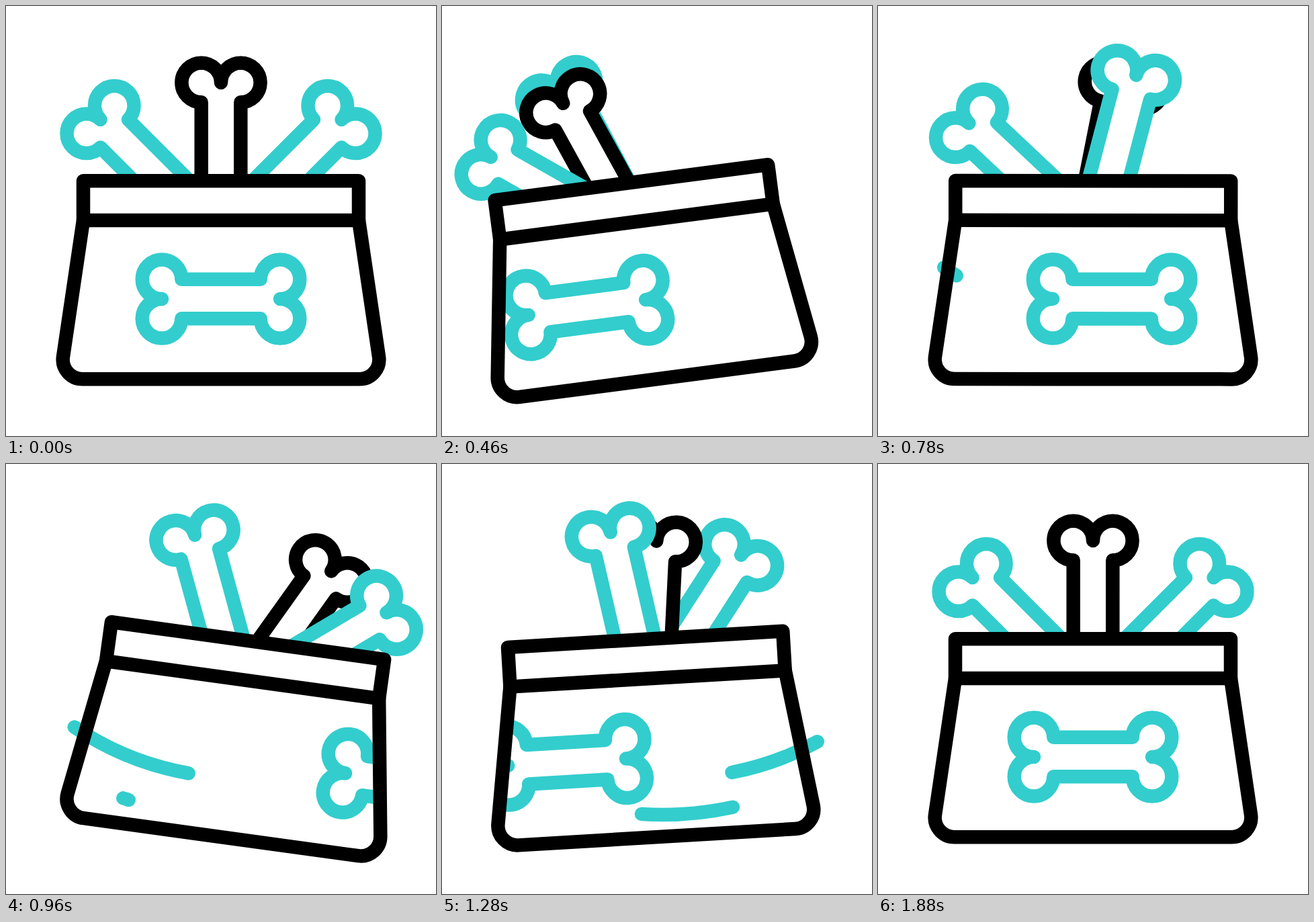
Write an HTML page that moves like this. It is 640 px wide and 640 px high and loops after 2.4 s.

```html
<!DOCTYPE html>
<html lang="en">
<head>
<meta charset="utf-8">
<title>Swinging bag of bones</title>
<style>
  html, body { margin: 0; width: 100%; height: 100%; overflow: hidden; background: #fff; }
  svg { display: block; width: 100vw; height: 100vh; }
  path { stroke-width: 20.5; stroke-linecap: round; stroke-linejoin: round; fill: none; stroke: #000; }
  .teal { stroke: #33cdcd; }
  .solid { fill: #fff; }
  .cover { fill: #fff; stroke: none; }
</style>
</head>
<body>
<svg viewBox="0 0 640 640">
  <defs>
    <clipPath id="inside">
      <path d="M115 319L85 522A29 29 0 0 0 113.8 555.2H526.2A29 29 0 0 0 555 522L525 319Z"/>
    </clipPath>
  </defs>
  <g id="loose"></g>
  <g id="back">
    <path class="cover" d="M115 260.3H525V319L555 522A29 29 0 0 1 526.2 555.2H113.8A29 29 0 0 1 85 522L115 319Z"/>
    <g clip-path="url(#inside)">
      <path id="printOut" class="teal"/>
      <path id="printIn" class="teal"/>
    </g>
  </g>
  <path id="streakA" class="teal"/>
  <path id="streakB" class="teal"/>
  <g id="front">
    <path d="M115 319L85 522A29 29 0 0 0 113.8 555.2H526.2A29 29 0 0 0 555 522L525 319"/>
    <path d="M115 260.3H525V319H115Z"/>
  </g>
</svg>
<script>
const LOOP = 2400;
const HEAD = 29.3;
const PIVOT = [320, 348.5];
const $ = id => document.getElementById(id);

// Each track is a list of [time, value], eased between neighbours.
const tracks = {
  bag: [[0, 0], [560, -8.1], [1002, 8.2], [1325, -4], [1620, 2], [1885, 0]],
  left: [[0, 0], [450, -8], [765, -2], [1150, 44.5], [1600, 0]],
  middle: [[0, 0], [465, -21.4], [985, 28], [1410, 0]],
  right: [[0, 0], [555, -71], [1000, 8.3], [1175, -10.5], [1600, 0]],
  printOut: [[0, 0], [590, -102], [1170, 410]],
  printIn: [[1030, -380], [1440, 0]]
};

const clamp = v => Math.max(0, Math.min(1, v));
const ease = v => v * v * (3 - 2 * v);

function valueAt(keys, t) {
  let i = 0;
  while (i < keys.length - 2 && t >= keys[i + 1][0]) i++;
  const [t0, v0] = keys[i], [t1, v1] = keys[i + 1];
  return v0 + (v1 - v0) * ease(clamp((t - t0) / (t1 - t0)));
}

// Upright bone whose origin is the shared pivot inside the bag.
function makeBone(reach, tilt, track, cls) {
  const el = document.createElementNS("http://www.w3.org/2000/svg", "path");
  const arc = `A${HEAD} ${HEAD} 0 1 1 `;
  el.setAttribute("class", cls);
  el.setAttribute("d", `M${-HEAD} -60V${HEAD - reach}${arc}0 ${-reach}${arc}${HEAD} ${HEAD - reach}V-60`);
  return { el, tilt, track };
}

const left = makeBone(253.8, -45, tracks.left, "teal solid");
const middle = makeBone(234.5, 0, tracks.middle, "solid");
const right = makeBone(253.8, 45, tracks.right, "teal solid");
const bones = [right, middle, left];
const loose = $("loose");

const loop = `A${HEAD} ${HEAD} 0 1 0 `;
const printed = `M261.3 406.7${loop}232 436${loop}261.3 465.3H378.7${loop}408 436${loop}378.7 406.7Z`;
$("printOut").setAttribute("d", printed);
$("printIn").setAttribute("d", printed);

// Streaks are arcs; angles are degrees from straight down, times are [start, end].
const streaks = [
  { el: $("streakA"), cx: 348, cy: 27, r: 440, from: -34.6, to: 30.9, head: [757, 1300], tail: [957, 1423] },
  { el: $("streakB"), cx: 328, cy: 30, r: 492, from: -18.2, to: 18.2, head: [950, 1345], tail: [1120, 1522] }
];

function drawStreak(s, t) {
  const angle = ([a, b]) => s.from + (s.to - s.from) * clamp((t - a) / (b - a));
  const point = deg => {
    const a = deg * Math.PI / 180;
    return `${s.cx + s.r * Math.sin(a)} ${s.cy + s.r * Math.cos(a)}`;
  };
  const shown = t > s.head[0] && t < s.tail[1];
  s.el.setAttribute("d", shown
    ? `M${point(angle(s.tail))}A${s.r} ${s.r} 0 0 0 ${point(angle(s.head))}` : "");
}

let leaning = null;

function stack(leansRight) {
  if (leansRight === leaning) return;
  leaning = leansRight;
  const order = leansRight ? [...bones].reverse() : bones;
  order.forEach(b => loose.appendChild(b.el));
}

function draw(t) {
  const swing = `rotate(${valueAt(tracks.bag, t)} 320 555)`;
  for (const id of ["loose", "back", "front"]) $(id).setAttribute("transform", swing);

  stack(t >= 560 && t < 1040);
  for (const b of bones) {
    b.el.setAttribute("transform", `translate(${PIVOT}) rotate(${b.tilt + valueAt(b.track, t)})`);
  }

  const outgoing = t < 1170, incoming = t >= 1030;
  $("printOut").setAttribute("visibility", outgoing ? "visible" : "hidden");
  $("printIn").setAttribute("visibility", incoming ? "visible" : "hidden");
  for (const id of ["printOut", "printIn"]) {
    $(id).setAttribute("transform", `translate(${valueAt(tracks[id], t)} 0)`);
  }
  streaks.forEach(s => drawStreak(s, t));
}

const start = performance.now();
function tick() {
  draw((performance.now() - start) % LOOP);
  requestAnimationFrame(tick);
}
tick();
</script>
</body>
</html>
```
